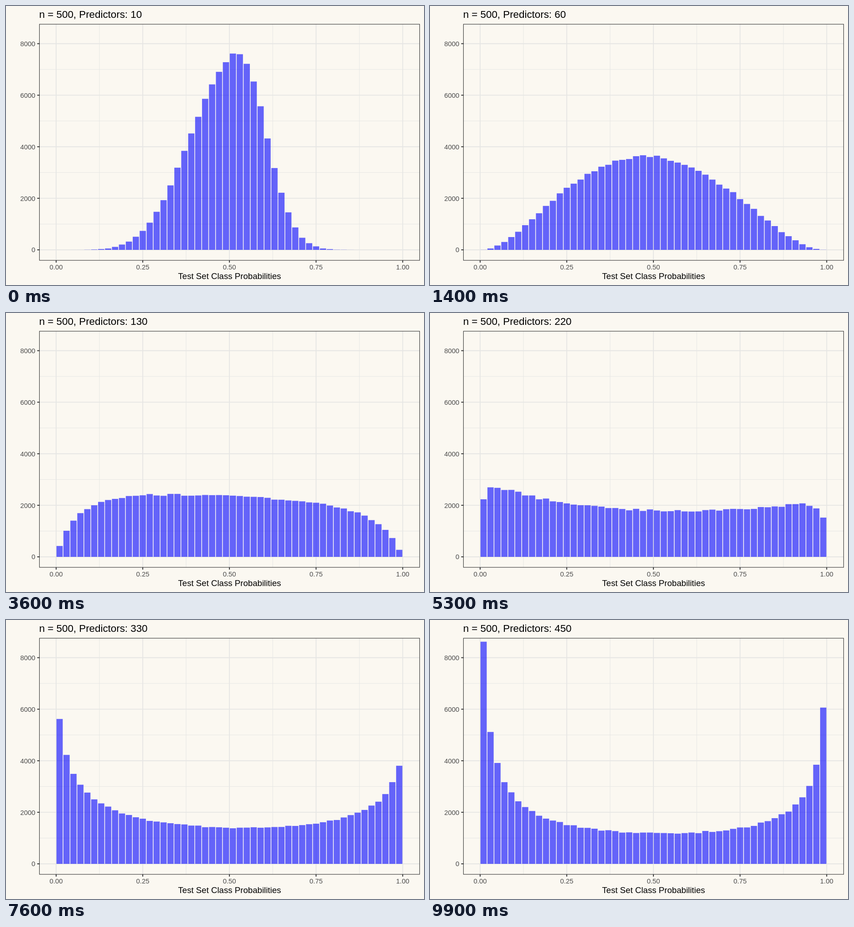
These frames come from a looping animation (917 px wide and 611 px high, 10000 ms). An HTML page:

```html
<!DOCTYPE html>
<html lang="en">
<head>
<meta charset="utf-8">
<title>Test Set Class Probabilities</title>
<style>
  html, body { margin: 0; width: 100%; height: 100%; overflow: hidden; background: #fbf8f1; }
  svg { display: block; font-family: "Liberation Sans", Arial, sans-serif; }
</style>
</head>
<body>
<svg id="chart" width="917" height="611" viewBox="0 0 917 611"></svg>
<script>
const chart = document.getElementById('chart');
const BINS = 50, TOTAL = 100000;
const LEFT = 73.4, RIGHT = 907.4, TOP = 39.9, BOTTOM = 557;
const px = v => 110 + 760.3 * v;
const py = count => 534 - count * 0.05644;

function add(name, attrs, text) {
  const el = document.createElementNS('http://www.w3.org/2000/svg', name);
  for (const key in attrs) el.setAttribute(key, attrs[key]);
  if (text) el.textContent = text;
  return chart.appendChild(el);
}
const line = (x1, y1, x2, y2, stroke, width) =>
  add('line', { x1, y1, x2, y2, stroke, 'stroke-width': width });
const label = (x, y, size, fill, anchor, text) =>
  add('text', { x, y, 'font-size': size, fill, 'text-anchor': anchor }, text);

// Grid: thin minor lines first, then major lines
for (const [shift, width] of [[0.5, 1], [0, 1.9]]) {
  for (let i = 0; i + shift <= 4; i++) {
    const x = px((i + shift) / 4), y = py((i + shift) * 2000);
    line(LEFT, y, RIGHT, y, '#e6e6e4', width);
    line(x, TOP, x, BOTTOM, '#e6e6e4', width);
  }
}

const bars = Array.from({ length: BINS }, (_, i) => add('rect', {
  x: px((i + 0.05) / BINS), width: 760.3 * 0.9 / BINS, fill: '#00f', 'fill-opacity': 0.6
}));

add('rect', { x: LEFT, y: TOP, width: RIGHT - LEFT, height: BOTTOM - TOP,
  fill: 'none', stroke: '#333', 'stroke-width': 1.1 });
for (let i = 0; i <= 4; i++) {
  const x = px(i / 4), y = py(i * 2000);
  line(x, BOTTOM, x, BOTTOM + 5, '#333', 1.9);
  line(LEFT - 5, y, LEFT, y, '#333', 1.9);
  label(x, 577.3, 14.9, '#4d4d4d', 'middle', (i / 4).toFixed(2));
  label(64.3, y + 5.4, 14.9, '#4d4d4d', 'end', String(i * 2000));
}
label(490.4, 598.3, 18.65, '#000', 'middle', 'Test Set Class Probabilities');
const title = label(72.7, 26, 22.35, '#000', 'start', ' ');

// Variance of the log-odds at a few numbers of predictors
const variances = [[10, .172], [40, .59], [60, .76], [135, 1.78], [220, 3.05], [335, 4.98], [450, 7.28]];

function variance(p) {
  const j = Math.max(1, variances.findIndex(([q]) => q >= p));
  const [p0, v0] = variances[j - 1], [p1, v1] = variances[j];
  return v0 + (v1 - v0) * (p - p0) / (p1 - p0);
}

// Seeded random number in -1..1
function noise(a, b) {
  const r = Math.sin(a * 12.9898 + b * 78.233) * 43758.5453;
  return 2 * (r - Math.floor(r)) - 1;
}

// Log-odds follow a t curve (30 degrees of freedom), skewed left for few predictors
function histogram(p) {
  const skew = 0.23 * Math.exp((10 - p) / 12);
  const mode = 0.55 * skew - 0.025 - 0.0006 * p;
  const spread = Math.sqrt(variance(p));
  const density = bars.map((_, i) => {
    const x = (i + 0.5) / BINS;
    const d = Math.log(x / (1 - x)) - mode;
    const z = d / (spread * (1 - skew * Math.sign(d)));
    return (1 + z * z / 30) ** -15.5 / (x * (1 - x));
  });
  const scale = TOTAL / density.reduce((a, b) => a + b);
  return density.map((d, i) => {
    const count = d * scale;
    return Math.max(0, count + Math.sqrt(count) * noise(p, i));
  });
}

// Early states hold two ticks and later ones one, with a halfway tick between states
function stateAt(tick) {
  if (tick >= 34) return (tick - 11) / 2;
  const n = tick + 1;
  return Math.floor(n / 3) + (n % 3 === 2 ? 0.5 : 0);
}

let shown = -1;
function draw(now) {
  const tick = Math.floor(now / 100) % 100;
  if (tick === shown) return;
  shown = tick;
  const state = stateAt(tick);
  const predictors = 10 + 10 * Math.floor(state);
  const from = histogram(predictors);
  const to = histogram(10 + 10 * Math.ceil(state));
  bars.forEach((bar, i) => {
    const y = py((from[i] + to[i]) / 2);
    bar.setAttribute('y', y);
    bar.setAttribute('height', 534 - y);
  });
  title.textContent = `n = 500, Predictors: ${predictors}`;
}
function loop() {
  draw(performance.now());
  requestAnimationFrame(loop);
}
loop();
</script>
</body>
</html>
```
